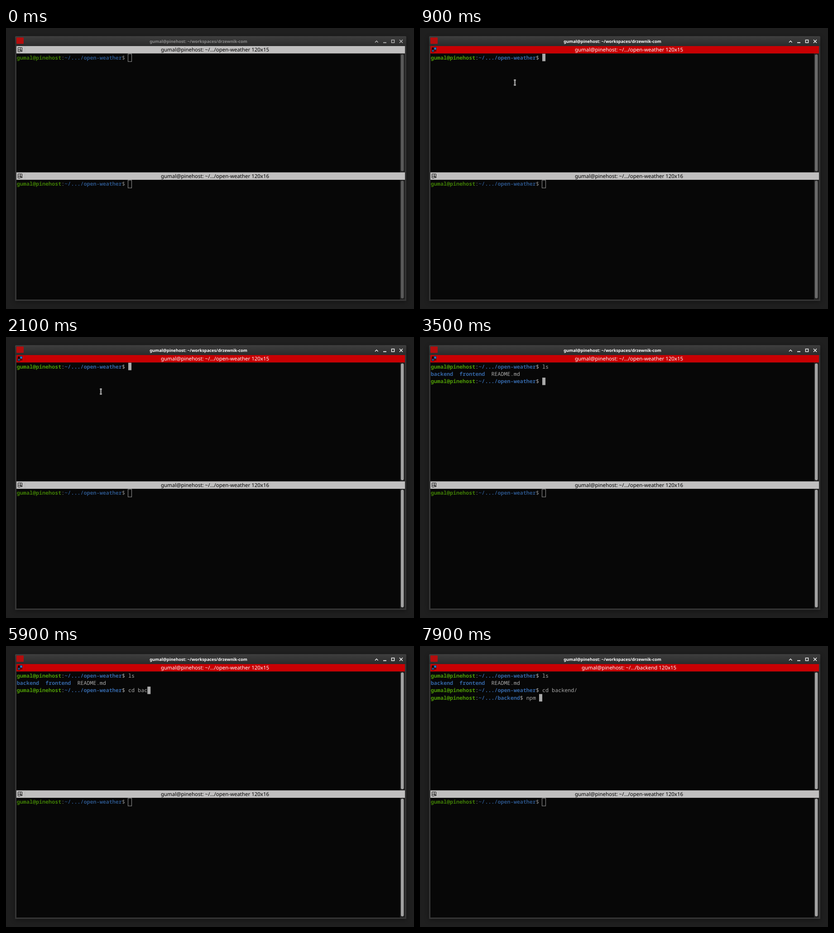
An HTML page for the animation above (8000 ms loop, 901 by 622 pixels).

```html
<!DOCTYPE html>
<html lang="en">
<head>
<meta charset="utf-8">
<title>Split terminal</title>
<style>
html, body { margin: 0; width: 100%; height: 100%; overflow: hidden; background: #1f1f1f; }
svg { display: block; }
text { white-space: pre; text-rendering: geometricPrecision; }
.mono { font: 11.72px "Noto Sans Mono", monospace; }
.bold { font-weight: 700; }
.head { font: 11.44px "Noto Sans", sans-serif; text-anchor: middle; }
.title { font: 700 9.25px "Noto Sans", sans-serif; text-anchor: middle; }
</style>
</head>
<body>
<svg width="901" height="622" viewBox="0 0 901 622">
  <defs>
    <linearGradient id="bar" x2="0" y2="1">
      <stop stop-color="#3e3e3e"/><stop offset="1" stop-color="#2b2b2b"/>
    </linearGradient>
    <filter id="blur" x="-5%" y="-5%" width="110%" height="110%"><feGaussianBlur stdDeviation="6"/></filter>
  </defs>
  <rect width="901" height="622" fill="#1f1f1f"/>
  <rect x="20" y="22" width="864" height="584" opacity=".4" filter="url(#blur)"/>
  <path d="M20 604V21q0-3 3-3H881q3 0 3 3V604z" fill="#353535"/>
  <path d="M20 40V21q0-3 3-3H881q3 0 3 3V40z" fill="url(#bar)"/>
  <rect x="23" y="21" width="16" height="14" rx="1" fill="#b30d0d"/>
  <g id="scene"></g>
</svg>
<script>
const LOOP = 8000, FOCUS = 900, CELL = 7.035, LINE = 16.45, LEFT = 23.8;
const HOST = 'gumal@pinehost';
const scene = document.getElementById('scene');

// One entry per prompt: when it appears, its row, and the time of each typed character
const prompts = [
  { at: 0, row: 0, dir: 'open-weather', cmd: 'ls', keys: [2400, 2500] },
  { at: 3500, row: 2, dir: 'open-weather', cmd: 'cd backend/',
    keys: [5000, 5100, 5200, 5600, 5700, 5900, 6000, 6200, 6200, 6200, 6200] },
  { at: 6600, row: 3, dir: 'backend', cmd: 'npm ', keys: [7500, 7600, 7800, 7900] },
];
// Moments that restart the cursor blink
const wakes = [FOCUS, 7400, ...prompts.flatMap(p => [p.at, ...p.keys])];

const rect = (x, y, w, h, fill, more = '') =>
  `<rect x="${x}" y="${y}" width="${w}" height="${h}" fill="${fill}" ${more}/>`;
const line = (d, color, width = 1) =>
  `<path d="${d}" fill="none" stroke="${color}" stroke-width="${width}"/>`;
const label = (cls, x, y, fill, str) =>
  `<text class="${cls}" x="${x}" y="${y}" fill="${fill}">${str}</text>`;

const palette = lit => lit
  ? { green: '#4e9a06', blue: '#3465a4', grey: '#aaaaaa' }
  : { green: '#3e7b05', blue: '#2a5183', grey: '#888888' };

function run(top, row, col, str, fill, bold) {
  return label(bold ? 'mono bold' : 'mono', LEFT + col * CELL, top + row * LINE + 12.5, fill, str);
}

function prompt(top, row, dir, cmd, c) {
  const path = '~/.../' + dir, end = HOST.length + 1 + path.length;
  return run(top, row, 0, HOST, c.green, true) +
    run(top, row, HOST.length, ':', c.grey) +
    run(top, row, HOST.length + 1, path, c.blue, true) +
    run(top, row, end, '$ ' + cmd, c.grey);
}

function cursor(top, row, dir, typed, lit, on) {
  const x = LEFT + (HOST.length + 9 + dir.length + typed) * CELL, y = top + row * LINE;
  if (!lit) return rect(269.5, top + .3, 8, 17, 'none', 'stroke="#999"');
  return on ? rect(x, y, CELL, 16.5, '#aaaaaa') : '';
}

function groupIcon(y, lit) {
  if (lit) return rect(26, y + 3, 5, 5, '#2a0505') + rect(31, y + 3, 5, 5, '#1d86d6', 'stroke="#17324d"') +
    rect(26, y + 8, 5, 5, '#1d5f9c', 'stroke="#2a0505"') + rect(32, y + 9, 4, 3, '#5a0505');
  return line(`M26.5 ${y + 3.5}h9v5h-9zM26.5 ${y + 8.5}v4h5v-9`, '#111') +
    `<path d="M32 ${y + 10}h5l-2.5 3z" fill="#111"/>`;
}

function pane(y, bottom, title, lit, thumb) {
  return rect(23, y, 858, 16.6, lit ? '#c80003' : '#c0bfbf') +
    rect(41.5, y, 1, 16.6, lit ? '#bd0003' : '#b6b5b5') +
    groupIcon(y, lit) +
    label('head', 461.5, y + 12.4, lit ? '#fff' : '#000', title) +
    rect(23, y + 16.5, 847, bottom - y - 16.5, '#070707') +
    rect(870, y + 16.5, 11, bottom - y - 16.5, '#202020') +
    rect(872, y + 18.5, 6.4, bottom - y - 21, thumb, 'rx="3"');
}

function windowBar(active) {
  const c = active ? '#ffffff' : '#8c8c8c', b = active ? '#f2f2f2' : '#b8b8b8';
  return label('title', 425, 32.8, c, HOST + ': ~/workspaces/drzewnik-com') +
    line('M815 32l3.3-3.4 3.3 3.4', b, 1.5) + line('M833 32.4h7', b, 1.8) +
    line('M851.5 26.5h6v6h-6z', b, 1.5) + line('M869 26l7 7m0-7l-7 7', b, 1.5);
}

function pointer(t) {
  if (t < 300 || t >= 2400) return '';
  if (t < 400) return '<path d="M95.5 4.5v13l3-3 2 5 2-1-2-4.500h4z" fill="#111" stroke="#fff"/>';
  const [x, y] = t < 500 ? [172, 84] : [209.5, 120.8];
  const beam = `M${x - 2.3} ${y - 5.5}h1.300l1 1 1-1h1.300M${x} ${y - 4.5}v9M${x - 2.3} ${y + 5.5}h1.300l1-1 1 1h1.300`;
  return line(beam, '#f4f4f4', 2.6) + line(beam, '#111', .8);
}

function draw(t) {
  const lit = t >= FOCUS;
  const fade = Math.max(0, Math.min(3, Math.floor((t - FOCUS) / 100) + 1));
  const thumb = ['#5a5a5a', '#6a6a6a', '#8a8a8a', '#a3a3a3'][fade];
  const c = palette(lit);
  const shown = prompts.filter(p => p.at <= t), now = shown[shown.length - 1];
  const typed = p => p.keys.filter(k => k <= t).length;
  const wake = Math.max(...wakes.filter(w => w <= t));
  const on = Math.floor((t - wake) / 600) % 2 === 0;
  const top = 57, low = 336.7;

  return windowBar(lit) +
    pane(40, 319.6, `${HOST}: ~/.../${now.dir} 120x15`, lit, thumb) +
    pane(319.6, 601, `${HOST}: ~/.../open-weather 120x16`, false, thumb) +
    shown.map(p => prompt(top, p.row, p.dir, p.cmd.slice(0, typed(p)), c)).join('') +
    (t < 3500 ? '' : run(top, 1, 0, 'backend', c.blue, true) +
      run(top, 1, 9, 'frontend', c.blue, true) + run(top, 1, 19, 'README.md', c.grey)) +
    cursor(top, now.row, now.dir, typed(now), lit, on) +
    prompt(low, 0, 'open-weather', '', palette(false)) +
    cursor(low, 0, 'open-weather', 0, false) +
    pointer(t);
}

let last = '';
function frame() {
  const html = draw(performance.now() % LOOP);
  if (html !== last) scene.innerHTML = last = html;
  requestAnimationFrame(frame);
}
frame();
</script>
</body>
</html>
```
